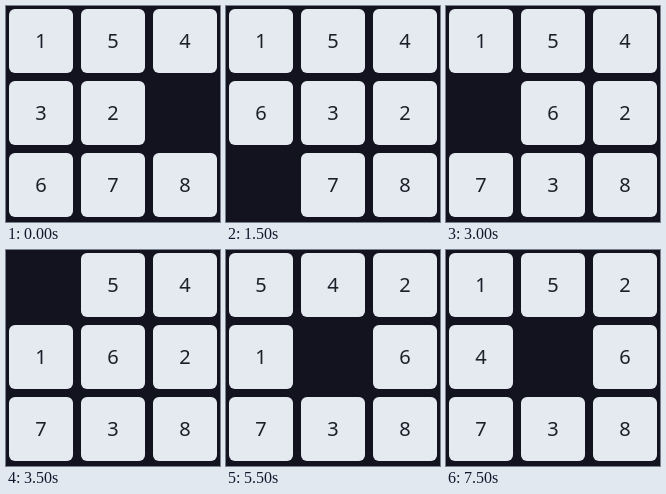
An HTML page with a canvas that plays this animation: 214 by 216 pixels, repeating every 8 s.

```html
<!DOCTYPE html>
<html lang="en">
<head>
<meta charset="utf-8">
<title>Sliding puzzle</title>
<style>
html, body { margin: 0; width: 214px; height: 216px; overflow: hidden; background: #12131e; }
canvas { display: block; }
</style>
</head>
<body>
<canvas id="board" width="214" height="216"></canvas>
<script>
const ctx = document.getElementById('board').getContext('2d');
const STEP = 500, PITCH = 72, SIZE = 64, EDGE = 3, RADIUS = 6;
const START = [1, 5, 4, 3, 2, 0, 6, 7, 8];
// Cell of the gap at each step
const GAPS = [5, 4, 3, 6, 7, 4, 3, 0, 1, 2, 5, 4, 1, 0, 3, 4];

function boardAt(step) {
  const cells = START.slice();
  for (let i = 1; i <= step; i++) {
    cells[GAPS[i - 1]] = cells[GAPS[i]];
    cells[GAPS[i]] = 0;
  }
  return cells;
}

function drawTile(value, cell) {
  const x = EDGE + (cell % 3) * PITCH;
  const y = EDGE + Math.floor(cell / 3) * PITCH;
  ctx.fillStyle = '#e5e9f0';
  ctx.beginPath();
  ctx.roundRect(x, y, SIZE, SIZE, RADIUS);
  ctx.fill();
  ctx.fillStyle = '#1c202a';
  ctx.fillText(value, x + SIZE / 2, y + 39);
}

function draw(now) {
  const step = Math.floor(now / STEP) % GAPS.length;
  ctx.fillStyle = '#12131e';
  ctx.fillRect(0, 0, 214, 216);
  ctx.font = '20px "Noto Sans", "Open Sans", sans-serif';
  ctx.textAlign = 'center';
  boardAt(step).forEach((value, cell) => { if (value) drawTile(value, cell); });
}

function tick() {
  draw(performance.now());
  requestAnimationFrame(tick);
}
tick();
</script>
</body>
</html>
```
